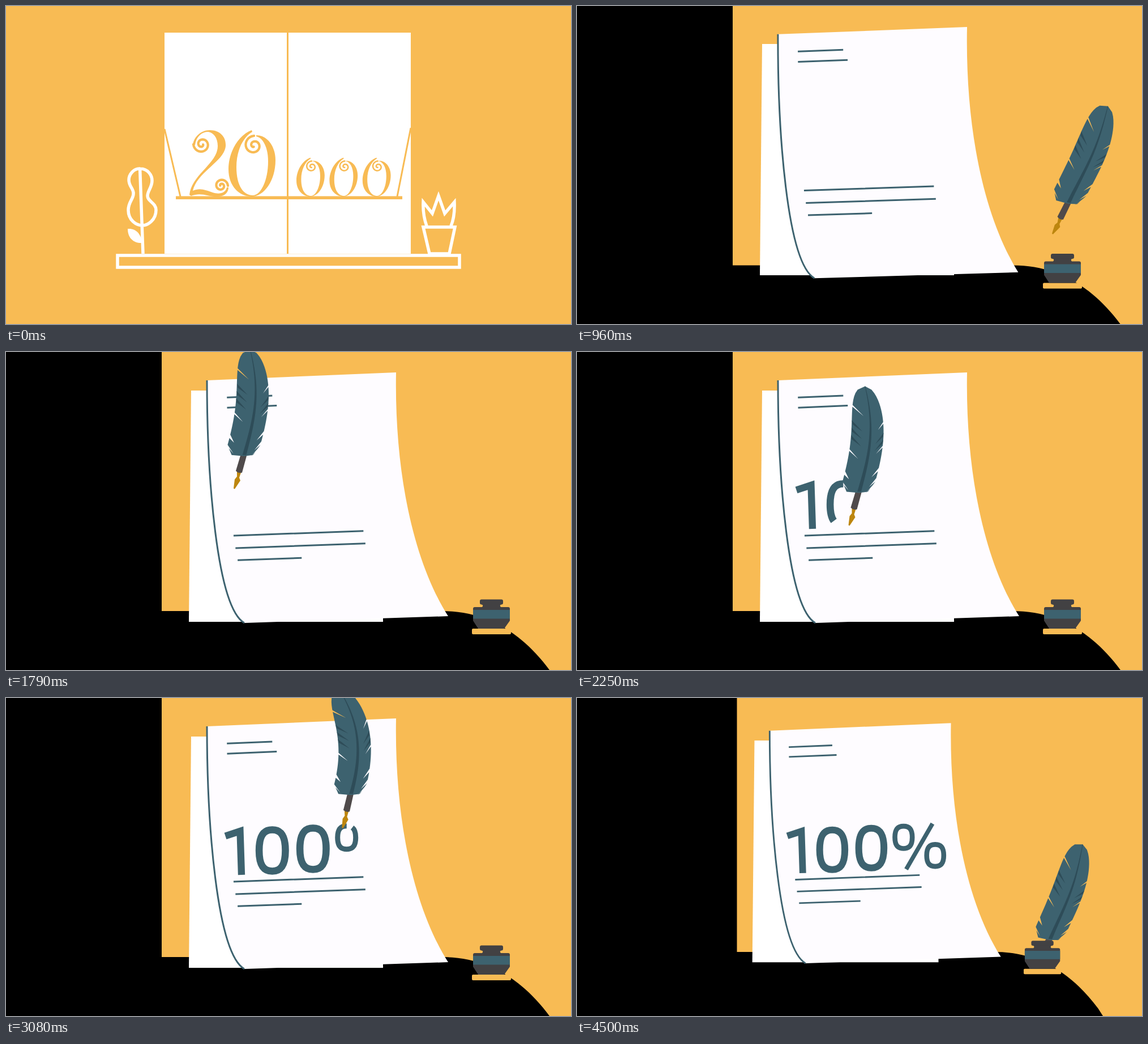
These frames come from a looping animation (998x561 px, 4540 ms). An HTML page:

```html
<!DOCTYPE html>
<html lang="en">
<head>
<meta charset="utf-8">
<title>Quill and paper</title>
<style>
html, body { margin: 0; width: 100%; height: 100%; overflow: hidden; background: #f8bb54; }
svg { display: block; width: 100vw; height: 100vh; }
.teal { fill: #3d626f; }
.dark { fill: #424143; }
.line { fill: none; stroke: #3d626f; stroke-width: 3; }
.ink { fill: none; stroke: #3d626f; }
.white { fill: none; stroke: #fff; stroke-width: 5.5; }
.gold { fill: #f8bb54; }
.curl { fill: none; stroke: #f8bb54; stroke-width: 4.2; stroke-linecap: round; }
</style>
</head>
<body>
<svg viewBox="0 0 998 561">
  <rect width="998" height="561" fill="#f8bb54"/>

  <g id="window">
    <path fill="#fff" d="M280 47H715V437H280Z"/>
    <path fill="none" stroke="#f8bb54" stroke-width="3" d="M497.5 47V437M280 217L308 336M715 215L691 336"/>
    <path class="gold" d="M300 335.5H700V341H300Z"/>
    <path class="gold" d="M330 245C332 230 345 219 360 219C378 219 389 231 388 247C386 274 338 292 330 326C342 320 354 325 365 329C377 333 388 330 390 320L393 320C393 331 383 337 372 336C356 336 344 328 327 335L324 333C328 297 374 278 374 247C374 232 366 223 357 222C346 222 336 230 334 245Z"/>
    <path id="curls" class="curl"/>
    <g id="zero">
      <path class="gold" d="M434 219C410 228 393 258 393 288C393 318 412 336 434 336C456 336 476 308 476 272C476 248 462 228 442 228V230C453 232 463 248 463 274C463 308 450 334 436 334C420 334 407 318 407 284C407 256 418 232 435 222Z"/>
      <path id="zeroCurl" class="curl"/>
    </g>
    <path class="white" d="M197 440H801V461H197Z"/>
    <path class="white" d="M236.500 285L242 437M237 287C250 287 258 298 258 308C258 320 250 326 250 335C250 345 265 347 265 360C265 378 250 387 241 387C230 387 216 378 216 360C216 345 226 340 225 330C225 322 217 318 217 307C217 297 226 286 237 287Z"/>
    <path fill="#fff" d="M215 393C230 392 238 402 241 418C226 419 215 410 215 393Z"/>
    <path class="white" d="M737 390H793L783 437H748ZM743 388Q736 368 737 346L753 366L764 335L775 366L792 346Q793 372 786 388"/>
  </g>

  <g id="desk">
    <g id="camera">
      <path id="table" d="M-20 457H770C840 457 905 487 960 561L1050 700H-20Z"/>
      <path id="sheet" fill="#fff" d="M327 68H666V476H323Z"/>
      <g id="page">
        <path id="face" fill="#fefcff"/>
        <path id="edge" class="line"/>
        <path id="rules" class="line"/>
      </g>
      <g id="ink"></g>
      <g id="quill">
        <path fill="#bd860f" d="M5 -31L12 -29L9 -20L11 -15L1 0L-1 -1L1 -17L5 -22Z"/>
        <path fill="#4f4a4b" d="M12 -62H23L14 -29Q8 -27 3 -32Z"/>
        <path id="vane" class="teal"/>
        <path id="marks" fill="#2e4c58"/>
      </g>
      <g id="pot">
        <rect class="gold" x="823" y="488" width="69" height="10" rx="2"/>
        <rect class="dark" x="837" y="436.500" width="41" height="9" rx="3"/>
        <path class="dark" d="M840 445H875Q871 447 874 450H887Q890 450 890 453V474L880 488H834L825 474V453Q825 450 828 450H841Q844 447 840 445Z"/>
        <path class="teal" d="M825 455H890V470.500H825Z"/>
      </g>
    </g>
    <rect id="panel" height="561"/>
  </g>
</svg>
<script>
const $ = id => document.getElementById(id);
const SVG = 'http://www.w3.org/2000/svg';
const LOOP = 4540, CUT = 40;
const clamp = v => Math.max(0, Math.min(1, v));
const mix = (a, b, k) => a + (b - a) * k;
const mixAll = (a, b, k) => a.map((v, i) => mix(v, b[i], k));
const smooth = k => k * k * (3 - 2 * k);
const shift = (id, y) => $(id).setAttribute('transform', `translate(0 ${y})`);
const poly = pts => 'M' + pts.map(p => p.map(v => v.toFixed(2)).join(' ')).join('L');

// Eased path through rows of [time, value, ...]
function track(rows, t) {
  const i = rows.findIndex(r => t < r[0]);
  if (i < 0) return rows[rows.length - 1].slice(1);
  if (i === 0) return rows[0].slice(1);
  const [a, b] = [rows[i - 1], rows[i]];
  return mixAll(a, b, smooth((t - a[0]) / (b[0] - a[0]))).slice(1);
}

// ---- Window scene
function spiral(cx, cy, r, angle) {
  const pts = [];
  for (let k = 0; k <= 1; k += .025) {
    const a = angle - k * 9.5, q = r * (1 - .88 * k);
    pts.push([cx + q * Math.cos(a), cy + q * Math.sin(a)]);
  }
  return poly(pts);
}
$('curls').setAttribute('d', spiral(346, 244, 15, Math.PI) + spiral(380, 317, 12, 0));
$('zeroCurl').setAttribute('d', spiral(438, 246, 17, -Math.PI / 2));
for (let i = 0; i < 3; i++) {
  const copy = $('zero').cloneNode(true);
  copy.setAttribute('transform', `translate(${277.2 + 58.4 * i} 139.5) scale(.6 .585)`);
  $('window').append(copy);
}

// ---- Page: left and right edges as cubic curves, lifted and settled
const LIFTED = [[[356, 53], [363, 180], [390, 415], [445, 444]], [[689, 20], [692, 150], [730, 320], [805, 410]]];
const SETTLED = [[[355, 50], [355, 220], [372, 450], [421, 478]], [[689, 36], [686, 205], [717, 365], [781, 466]]];
// Ruled lines: depth on the page, left and right end across it
const RULES = [[.074, .105, .345], [.116, .105, .368], [.643, .09, .75], [.694, .09, .745], [.744, .09, .41]];

function cubic(p, t) {
  while (p.length > 1) p = p.slice(1).map((b, i) => mixAll(p[i], b, t));
  return p[0];
}

// Point on an edge at a share of its height
function edgeAt(p, v) {
  const y = mix(p[0][1], p[3][1], v);
  let lo = 0, hi = 1;
  for (let i = 0; i < 16; i++) {
    const mid = (lo + hi) / 2;
    if (cubic(p, mid)[1] < y) lo = mid; else hi = mid;
  }
  return cubic(p, lo);
}

function drawPage(t) {
  const tau = Math.max(0, Math.min(800, t - 580));
  const curl = 1 - 2.12 * Math.exp(-tau / 312) * Math.cos(.00724 * tau - 1.08);
  const [l, r] = LIFTED.map((e, i) => e.map((p, j) => mixAll(p, SETTLED[i][j], curl)));
  const left = `M${l[0]}C${l.slice(1).join(' ')}`;
  $('edge').setAttribute('d', left);
  $('face').setAttribute('d', `${left}L${r[3]}C${r[2]} ${r[1]} ${r[0]}Z`);
  $('rules').setAttribute('d', RULES.map(([v, from, to]) => {
    const a = edgeAt(l, v), b = edgeAt(r, v);
    return poly([mixAll(a, b, from), mixAll(a, b, to)]);
  }).join(''));
  shift('page', 540 * (1 - clamp((t - CUT) / 540)) ** 3);
}

// ---- Handwriting: path, width, start, end
function ring(cx, cy, rx, ry) {
  const k = .69, p = (x, y) => [cx + x * rx, cy + y * ry];
  return `M${p(0, -1)}C${p(-k, -1)} ${p(-1, -k)} ${p(-1, 0)}C${p(-1, k)} ${p(-k, 1)} ${p(0, 1)}` +
    `C${p(k, 1)} ${p(1, k)} ${p(1, 0)}C${p(1, -k)} ${p(k, -1)} ${p(0, -1)}Z`;
}
const strokes = [
  ['M387.5 243.5L413.5 235L416 312', 12.3, 1800, 2070],
  [ring(470.3, 269, 23.2, 36.5), 12.6, 2130, 2430],
  [ring(542.3, 266, 23.2, 36.5), 12.6, 2600, 2890],
  [ring(601.7, 246.2, 16, 20.5), 9, 2935, 3095],
  ['M655 221L606.500 305', 7.8, 3220, 3370],
  [ring(660, 279.5, 15.7, 20.2), 9, 3440, 3670]
].map(([d, width, from, to]) => {
  const el = document.createElementNS(SVG, 'path');
  const set = { d, class: 'ink', 'stroke-width': width, pathLength: 1, 'stroke-dasharray': '1 2' };
  for (const name in set) el.setAttribute(name, set[name]);
  $('ink').append(el);
  const len = el.getTotalLength(), closed = d.endsWith('Z');
  // The nib runs a little ahead of the ink
  const nib = k => {
    const f = k + .15, p = el.getPointAtLength(len * (closed ? f % 1 : Math.min(1, f)));
    return [p.x, p.y + 3];
  };
  return { el, from, to, nib };
});

// ---- Quill
const REST = [838, 486];
const stops = [[420, ...REST], [1380, 841, 345]];
for (const s of strokes) stops.push([s.from, ...s.nib(0)], [s.to, ...s.nib(1)]);
stops.push([3880, 757, 233], [4150, 838, 385], [4330, ...REST]);
// Tilt, vane turn, vane bend per pixel (degrees)
const pose = [[420, 16, -8.6, .09], [1080, 10, 0, .1], [1380, 6, 19, .56], [1700, 0, 0, 0],
  [2250, 0, 0, 0], [3080, -2.7, 2.7, -.107], [3880, -1, -3.5, -.12], [4330, 16, -8.6, .09]];

function nibAt(t) {
  const s = strokes.find(s => t >= s.from && t <= s.to);
  return s ? s.nib((t - s.from) / (s.to - s.from)) : track(stops, t);
}

// Vane points are [offset from the rib, height along it]
const TALL = 186;
const span = (s, full) => full * Math.sqrt(Math.max(0, 1 - (s / TALL) ** 6)) * Math.min(1, .65 + s / 50);
const left = s => -span(s, 34.5), right = s => span(s, 23.5);

// One side of the vane, with slits given as {height: depth}
function vaneSide(edge, slits) {
  const pts = [[0, -2]];
  for (let s = 0; s <= TALL; s += 6) {
    const d = slits[s];
    pts.push([edge(s), s]);
    if (d) pts.push([edge(s) * (1 - d), s - 27 * d]);
    if (d > .4) pts.push([edge(s + 3), s + 3]);
  }
  return pts;
}
const VANE = [
  ...vaneSide(left, { 12: .35, 30: .3, 72: .5, 150: .62 }),
  ...vaneSide(right, { 6: .35, 18: .35, 36: .38, 78: .42, 120: .42 }).reverse()
];
const RIB = [];
for (let s = 0; s <= TALL; s += 6) {
  const w = .4 + 3 * (1 - s / TALL);
  RIB.push([w, s]);
  RIB.unshift([-w, s]);
}
const barb = (edge, s) => [[edge(s), s], [edge(s) * .43, s - 20], [edge(s) * .97, s - 7]];
const MARKS = [RIB];
for (let i = 0; i < 3; i++) MARKS.push(barb(left, 126 - 13 * i));
for (let i = 0; i < 2; i++) MARKS.push(barb(right, 104 - 12 * i));

// Lays vane points along an arc that starts at its foot
function bender(turn, bend) {
  const rad = Math.PI / 180, a = turn * rad, c = bend * rad;
  return ([off, s]) => {
    const u = off + 20 * Math.sin(Math.PI * s / 225), f = a + c * Math.max(0, s);
    const mid = (a + f) / 2, half = (f - a) / 2;
    const chord = s * (Math.abs(half) > 1e-6 ? Math.sin(half) / half : 1);
    return [18 + chord * Math.sin(mid) + u * Math.cos(f), -60 - chord * Math.cos(mid) + u * Math.sin(f)];
  };
}

function drawQuill(t, drop) {
  const [tilt, turn, bend] = track(pose, t), [x, y] = nibAt(t), lay = bender(turn, bend);
  const shape = pts => poly(pts.map(lay)) + 'Z';
  $('vane').setAttribute('d', shape(VANE));
  $('marks').setAttribute('d', MARKS.map(shape).join(''));
  $('quill').setAttribute('transform', `translate(${x} ${y + drop}) rotate(${tilt})`);
}

function draw(t) {
  const intro = t < CUT;
  $('window').style.display = intro ? '' : 'none';
  $('desk').style.display = intro ? 'none' : '';
  if (intro) return;

  const tau = t - CUT, drop = 110 * Math.exp(-tau / 170);
  shift('table', drop);
  shift('pot', drop);
  shift('sheet', 530 * Math.exp(-tau / 150) * Math.cos(tau / 261));
  drawPage(t);
  for (const s of strokes) {
    const k = clamp((t - s.from) / (s.to - s.from));
    s.el.style.visibility = k ? 'visible' : 'hidden';
    s.el.setAttribute('stroke-dashoffset', 1 - k);
  }
  drawQuill(t, drop);

  const z = clamp((t - 3715) / 785) ** 2, scale = 1 - .0413 * z;
  $('camera').setAttribute('transform', `translate(0 ${237 * (1 - scale)}) scale(${scale})`);
  $('panel').setAttribute('width', 275 + 7.5 * z);
}

const start = performance.now();
function tick() {
  draw((performance.now() - start) % LOOP);
  requestAnimationFrame(tick);
}
tick();
</script>
</body>
</html>
```
